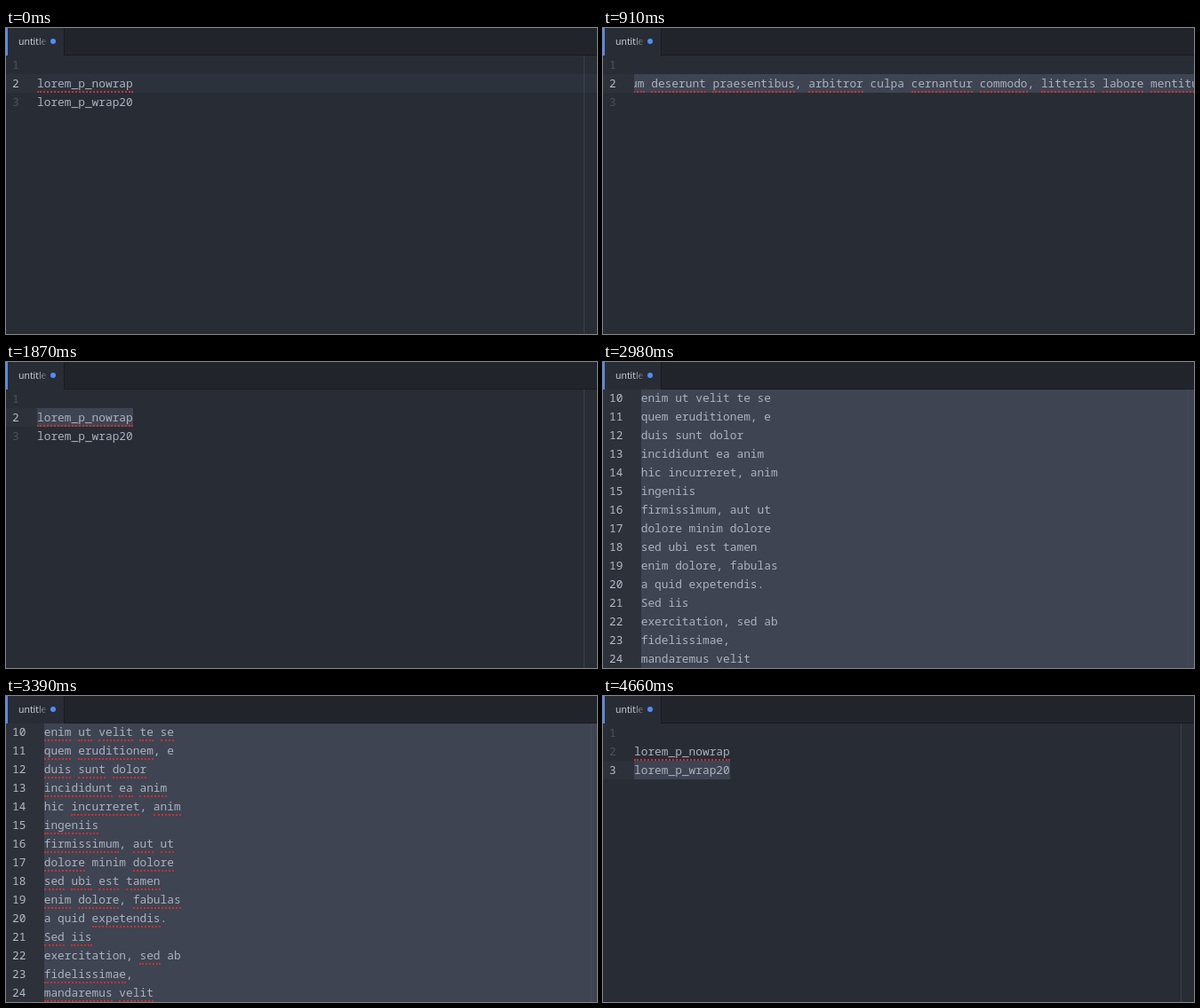
Recreate the animation shown at these times as an HTML page. Size 665x345 px, loop 5750 ms.

```html
<!DOCTYPE html>
<html lang="en">
<head>
<meta charset="utf-8">
<title>Snippet expansion in an editor</title>
<style>
html, body { margin: 0; width: 100%; height: 100%; overflow: hidden; background: #282c34; }
.stage { position: relative; width: 665px; height: 345px; overflow: hidden; background: #282c34; }
.stage div { position: absolute; box-sizing: border-box; }

.tabs { left: 0; top: 0; width: 665px; height: 31px; background: #21252b; border-bottom: 1px solid #181a1f; }
.tab { left: 0; top: 0; width: 66px; height: 31px; background: #282c34; border-left: 2px solid #528bff; border-right: 1px solid #181a1f; }
.title {
  left: 12px; top: 5px; width: 32px; overflow: hidden; white-space: nowrap;
  font: 10.5px/20px "Open Sans", "Noto Sans", sans-serif; color: #d7dae0;
  -webkit-mask-image: linear-gradient(90deg, #000 21px, transparent 34px);
  mask-image: linear-gradient(90deg, #000 21px, transparent 34px);
}
.dot { left: 48px; top: 12px; width: 6px; height: 6px; border-radius: 50%; background: #528bff; }

.editor {
  left: 0; top: 31px; width: 665px; height: 314px; overflow: hidden;
  font: 12.83px/21px "Noto Sans Mono", "DejaVu Sans Mono", monospace; color: #abb2bf;
}
.scene { left: 0; top: 0; width: 665px; height: 314px; }
.gutter { left: 0; height: 21px; padding-left: 7px; color: #4b5364; }
.gutter.on { color: #b4bac6; background: #2c313a; }
.line { right: 0; height: 21px; overflow: hidden; white-space: pre; }
.line.current { background: #2c323c; }
.line > div { top: 0; height: 21px; }
.sel { left: 0; background: #3e4451; }
.line > .mark { top: 19px; height: 2px; border-bottom: 2px dotted #c93133; }
.line > .cursor { width: 2px; background: #528bff; }
.guide { top: 0; width: 1px; height: 314px; background: rgba(171, 178, 191, .15); }
.guide.faint { background: rgba(171, 178, 191, .06); }

.timed, .late .mark, .fade .mark, .cursor { animation: 5.75s step-end infinite; }
.start { animation-name: start; }
.insert { animation-name: insert; }
.scrolled { animation-name: scrolled; }
.undone { animation-name: undone; }
.moved { animation-name: moved; }
.wrapped { animation-name: wrapped; }
.restored { animation-name: restored; }
.scrolled .late .mark { animation-name: spell-long; }
.wrapped .late .mark { animation-name: spell-wrap; }
.fade .mark { animation-name: unspell; }
.cursor { animation-name: blink; }

@keyframes start { 0% { opacity: 1 } 7.304%, to { opacity: 0 } }
@keyframes insert { 0% { opacity: 0 } 7.304% { opacity: 1 } 9.391%, to { opacity: 0 } }
@keyframes scrolled { 0% { opacity: 0 } 9.391% { opacity: 1 } 32.522%, to { opacity: 0 } }
@keyframes undone { 0% { opacity: 0 } 32.522% { opacity: 1 } 37.391%, to { opacity: 0 } }
@keyframes moved { 0% { opacity: 0 } 37.391% { opacity: 1 } 51.826%, to { opacity: 0 } }
@keyframes wrapped { 0% { opacity: 0 } 51.826% { opacity: 1 } 78.435%, to { opacity: 0 } }
@keyframes restored { 0% { opacity: 0 } 78.435%, to { opacity: 1 } }
@keyframes spell-long { 0% { opacity: 0 } 15.826%, to { opacity: 1 } }
@keyframes spell-wrap { 0% { opacity: 0 } 58.957%, to { opacity: 1 } }
@keyframes unspell { 0% { opacity: 1 } 81.043%, to { opacity: 0 } }
@keyframes blink { 0% { opacity: 1 } 46.957%, to { opacity: 0 } }
</style>
</head>
<body>
<div class="stage">
  <div class="editor"></div>
  <div class="tabs"></div>
  <div class="tab"><div class="title">untitled</div><div class="dot"></div></div>
</div>
<script>
const ROW = 21;
const KNOWN = new Set(['a', 'e', 'hic', 'ab', 'quid', 'minim', 'culpa', 'exercitation']);
const NOWRAP = 'lorem_p_nowrap';
const WRAP = 'lorem_p_wrap20';
const OPENING = 'Ab illum summis quorum, nescius malis excepteur nam veniam, ubi te aliqua domesticarum';
const LONG = 'um deserunt praesentibus, arbitror culpa cernantur commodo, litteris labore mentitum';
const PARAGRAPH = [
  'enim ut velit te se', 'quem eruditionem, e', 'duis sunt dolor',
  'incididunt ea anim', 'hic incurreret, anim', 'ingeniis',
  'firmissimum, aut ut', 'dolore minim dolore', 'sed ubi est tamen',
  'enim dolore, fabulas', 'a quid expetendis.', 'Sed iis',
  'exercitation, sed ab', 'fidelissimae,', 'mandaremus velit'
];

function add(parent, cls, style = {}, text = '') {
  const el = document.createElement('div');
  el.className = cls;
  el.textContent = text;
  Object.assign(el.style, style);
  parent.append(el);
  return el;
}

const mark = (line, start, length, shift = 0) =>
  add(line, 'mark', { left: `calc(${start}ch + ${shift}px)`, width: length + 'ch' });

function spell(line, text, shift) {
  for (const m of text.matchAll(/\w+/g)) {
    if (!KNOWN.has(m[0])) mark(line, m.index, m[0].length, shift);
  }
}

// sel is a CSS width; shift moves the text sideways inside the line
function addLine(scene, top, left, text, { cls = '', sel, shift = 0, spelled } = {}) {
  const line = add(scene, 'line ' + cls, { top: top + 'px', left: left + 'px' });
  if (sel) add(line, 'sel', { width: sel });
  add(line, 'text', { left: shift + 'px' }, text);
  if (spelled) spell(line, text, shift);
  return line;
}

const editor = document.querySelector('.editor');

function shortScene(name, active, guide = '') {
  const scene = add(editor, 'scene timed ' + name);
  for (let n = 1; n <= 3; n++) {
    add(scene, 'gutter' + (n === active ? ' on' : ''),
      { top: (n - 1) * ROW + 'px', width: '35px' }, n);
  }
  return scene;
}

const addGuide = (scene, x, cls = '') => add(scene, 'guide ' + cls, { left: x + 'px' });
const second = (scene, text, opts) => addLine(scene, ROW, 35, text, opts);
const third = (scene, opts) => addLine(scene, 2 * ROW, 35, WRAP, opts);

let scene = shortScene('start', 2);
second(scene, NOWRAP, { cls: 'current', spelled: true });
third(scene);
addGuide(scene, 650);

scene = shortScene('insert', 2);
second(scene, OPENING, { sel: '100%' });
third(scene);
addGuide(scene, 650);

scene = shortScene('scrolled', 2);
second(scene, LONG, { cls: 'late', sel: '100%', shift: -3.9, spelled: true });

scene = shortScene('undone', 2);
second(scene, NOWRAP, { sel: '14ch', spelled: true });
third(scene);
addGuide(scene, 650);

scene = shortScene('moved', 3);
second(scene, NOWRAP, { spelled: true });
add(third(scene, { cls: 'current' }), 'cursor', { left: '14ch' });
addGuide(scene, 650);

scene = add(editor, 'scene timed wrapped');
PARAGRAPH.forEach((text, i) => {
  const top = i * ROW - 1;
  add(scene, 'gutter on', { top: top + 'px', width: '43px' }, i + 10);
  addLine(scene, top, 42.7, text, { cls: 'late', sel: '100%', spelled: true });
});
addGuide(scene, 658, 'faint');

scene = shortScene('restored', 3);
second(scene, NOWRAP, { spelled: true });
mark(third(scene, { cls: 'fade', sel: '14ch' }), 2, 12);
addGuide(scene, 650);
</script>
</body>
</html>
```
